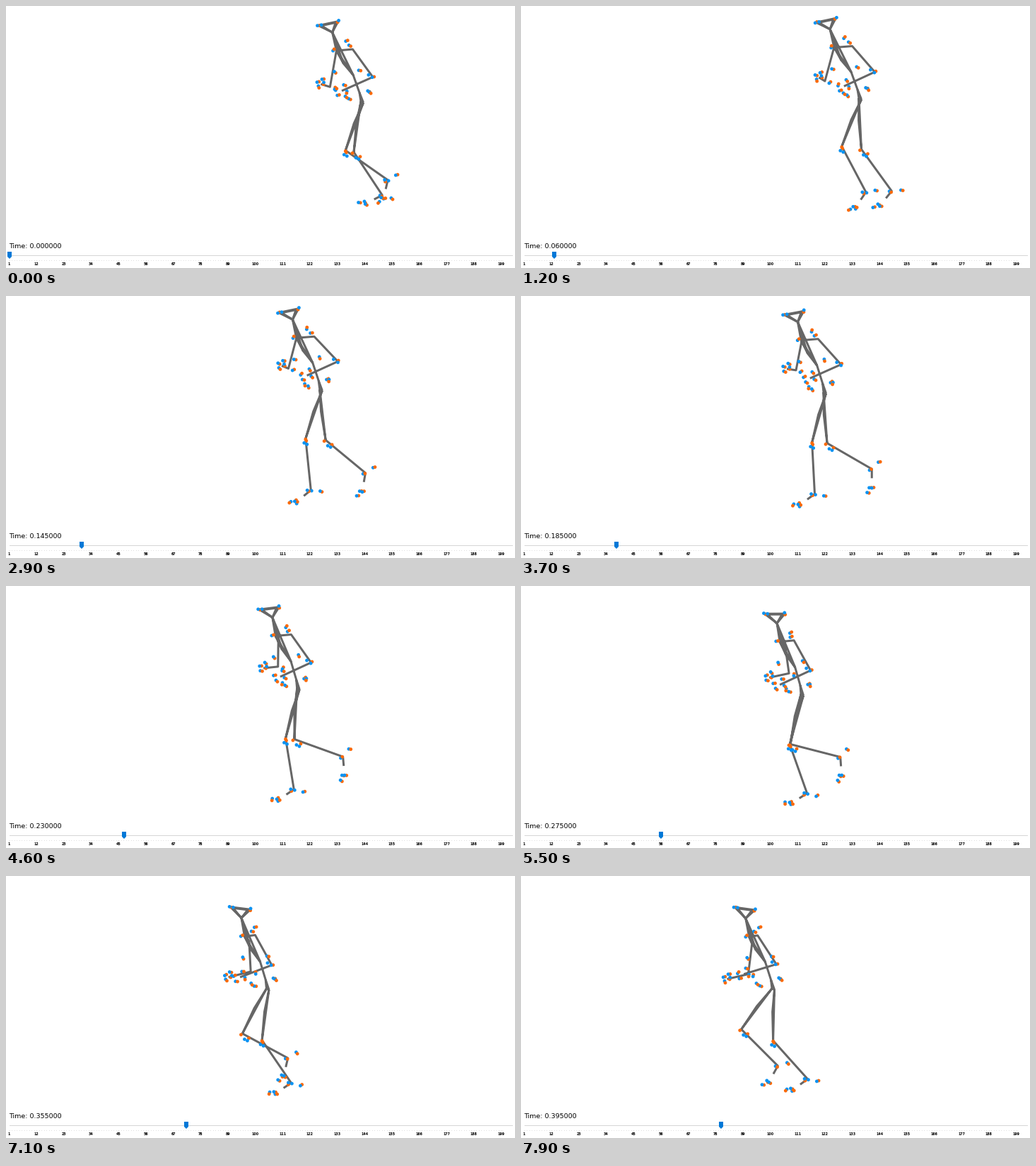
These frames come from a looping animation (720x370 px, 8000 ms). A matplotlib script:

```python
import numpy as np
import matplotlib.pyplot as plt
from matplotlib.animation import FuncAnimation

W, H, DPI = 720, 370, 100
FRAMES, STEP = 80, 0.005
PX = 72 / DPI
GREY, BLUE, ORANGE = "#666666", "#0a92f2", "#fb6a0a"
TICK = 696 / 198

# Points are complex numbers x + yj in stage pixels, one per step.
KEYS = np.array([0, 21, 37, 55, 79], float)
k = np.arange(FRAMES)
rng = np.random.default_rng(4)


def track(*v):
    """Smooth curve through the values at the key steps."""
    v = np.array(v, float)
    m = np.gradient(v, KEYS, edge_order=2)
    i = np.clip(np.searchsorted(KEYS, k, side="right") - 1, 0, len(KEYS) - 2)
    h = KEYS[i + 1] - KEYS[i]
    s = (k - KEYS[i]) / h
    return ((1 + 2 * s) * (1 - s) ** 2 * v[i] + s * (1 - s) ** 2 * h * m[i]
            + s * s * (3 - 2 * s) * v[i + 1] + s * s * (s - 1) * h * m[i + 1])


def bone(start, length, angle):
    """End of a bone; the angle is in degrees from straight down."""
    return start + length * 1j * np.exp(-1j * np.radians(angle))


def spin(degrees):
    return np.exp(1j * np.radians(degrees))


# Trunk: rigid, travels with the hip and sways a little
pts = {}
hip = pts["hip1"] = track(505, 463, 431, 399, 358) + 1j * track(136, 131, 137, 154, 160)
pts["hip2"] = hip - 3.5 - 1.5j
sway = spin(-2 * np.cos(2 * np.pi * (k - 9) / 95))
for name, offset in {"neck": -41 - 100.5j, "clav": -36 - 74.5j, "mid": -26.5 - 56j,
                     "chest": -13.2 - 39.3j, "pelvis": -5 - 14j,
                     "acromion": -21 - 88j}.items():
    pts[name] = hip + sway * offset

# Head: nods forward halfway
nod = spin(10 * np.tanh((k - 53) / 12) - 2)
for name, x, y in [("head_l", -14.3, 0), ("head_r", 14.3, 0),
                   ("brow_l", -10.3, 1), ("brow_r", 10.3, 1)]:
    pts[name] = pts["neck"] + nod * complex(x - 3, y - 13.5)

# Arms: the left forearm swings towards the viewer, so it changes length
pts["sh_r"] = pts["clav"] + track(23, 26, 24, 20, 12) - 2j
pts["elb_r"] = bone(pts["sh_r"], 48.5, track(36, 43, 42, 29, 33))
pts["wr_r"] = bone(pts["elb_r"], 48, track(-66, -65, -66, -65, -73))
pts["sh_l"] = pts["clav"] + track(0, 0, 1, 7, 4) + 1j * track(0, 0, 0, 2, 10)
pts["elb_l"] = bone(pts["sh_l"], track(52, 47, 43, 43, 43), track(-10, -16, -11, 8, -7))
pts["wr_l"] = pts["elb_l"] + track(-13, -8, -13, -28, -30) + 1j * track(-4, -5, -2, 6, 7)

# Legs: angles of thigh, shin and foot
GAIT = {
    "1": (track(-20.5, -22, -16, -15.5, -1.5), track(55, 14, 3, 19.5, 42),
          track(-13, -45, -54, -57, -54)),
    "2": (track(-8, 6.5, 4, -12, -37), track(33.5, 41.7, 60, 75.6, 45),
          track(-63, -23, 0, 4, -29)),
}
FOOT = {"heel": (14.5, 133), "toe_a": (34, -9), "toe_b": (26.5, -5), "toe_c": (26.5, 3)}
for leg, (thigh, shin, foot) in GAIT.items():
    start = pts["hip" + leg]
    knee = pts["knee" + leg] = bone(start, 72, thigh)
    ankle = pts["ankle" + leg] = bone(knee, 73, shin)
    pts["thigh" + leg] = 0.55 * start + 0.45 * knee - 2 - 1j
    pts["foot" + leg] = bone(ankle, 13, foot)
    for name, (r, turn) in FOOT.items():
        pts[name + leg] = bone(ankle, r, foot + turn)

BONES = [
    "head_l head_r neck head_l", "brow_l brow_r neck brow_l",
    "neck clav mid chest neck", "clav chest", "neck mid",
    "clav sh_r elb_r wr_r", "clav sh_l elb_l wr_l",
    "chest pelvis hip1", "pelvis hip2 hip1",
    "hip1 knee1 ankle1 foot1", "hip2 knee2 ankle2 foot2",
    "hip1 thigh1 knee1", "hip2 thigh2 knee2",
]

# Markers beside a point: pairs of both colours, then single ones
PAIRS = {
    "head_l": [0], "head_r": [0], "acromion": [0], "sh_r": [-4 - 5j],
    "clav": [-4 - 1j, -2 + 30.5j, 33 + 28j],
    "elb_r": [0.5], "elb_l": [7 + 2j],
    "wr_l": [3 - 7j, -4 - 3j, -3 + 4j, 4 - 1j],
    "wr_r": [4 - 8j, 7 + 2j, -5 + 6j, -8 - 2j],
    "hip1": [-19.5 - 5j, -24.5 - 8j, 7.5 - 16j, 9.5 - 14j],
    "ankle1": [-4 + 1j], "ankle2": [-2 + 1j],
    **{name + leg: [0] for name in FOOT for leg in GAIT},
}
SINGLES = {
    ORANGE: {"knee1": [1j, 1 + 3j], "knee2": [-2 + 1.5j, 9 + 6.5j]},
    BLUE: {"brow_l": [-1j], "elb_r": [-6 - 3j], "ankle1": [1 + 1j],
           "knee1": [-2 + 6j, 2 + 8j], "knee2": [3 + 8j, 7 + 10j]},
}


def spots(group):
    return [pts[name] + d for name, offsets in group.items() for d in offsets]


dots = []
for p in spots(PAIRS):
    turn = rng.normal(0.5, 0.8) + 0.6 * np.sin(2 * np.pi * (k / FRAMES + rng.random()))
    gap = 1.4 * np.exp(1j * turn)
    dots += [(p + gap, ORANGE), (p - gap, BLUE)]
for color, group in SINGLES.items():
    dots += [(p, color) for p in spots(group)]
dots = [dots[i] for i in rng.permutation(len(dots))]
dot_path = np.array([p for p, _ in dots])

fig = plt.figure(figsize=(W / DPI, H / DPI), dpi=DPI, facecolor="white")
ax = fig.add_axes([0, 0, 1, 1])
ax.set_xlim(-0.5, W - 0.5)
ax.set_ylim(H - 0.5, -0.5)
ax.axis("off")

# Slider track, ticks and labels
ax.plot([4, 715], [351, 351], color="#d6d6d6", lw=PX)
ax.plot(4 + TICK * np.arange(199), np.full(199, 358), ls="", marker="s",
        ms=PX, mew=0, color="#e0e0e0")
for n in range(1, 200, 11):
    ax.text(4 + TICK * (n - 1), 366, str(n), ha="center", va="baseline",
            family="DejaVu Sans", weight="bold", size=4.8 * PX)

skeleton, = ax.plot([], [], color=GREY, lw=3 * PX, solid_joinstyle="round",
                    solid_capstyle="butt")
markers = ax.scatter(dot_path[:, 0].real, dot_path[:, 0].imag,
                     s=(4.8 * PX) ** 2, c=[c for _, c in dots], lw=0, zorder=3)
handle, = ax.fill([0, 1, 1], [0, 0, 1], color="#0078d7", lw=0, zorder=5)
clock = ax.text(4, 342, "", family="DejaVu Sans", size=9.5 * PX, va="baseline")


def draw(n):
    path = []
    for chain in BONES:
        path += [pts[name][n] for name in chain.split()] + [complex(np.nan, np.nan)]
    path = np.array(path)
    skeleton.set_data(path.real, path.imag)
    now = dot_path[:, n]
    markers.set_offsets(np.column_stack([now.real, now.imag]))
    x = round(4 + TICK * n) + 0.5
    handle.set_xy([(x - 3, 346.5), (x + 3, 346.5), (x + 3, 353.5),
                   (x, 356.5), (x - 3, 353.5)])
    clock.set_text(f"Time: {n * STEP:.6f}")
    return skeleton, markers, handle, clock


anim = FuncAnimation(fig, draw, frames=FRAMES, interval=100, repeat=True,
                     repeat_delay=0, blit=False)
plt.show()
```
